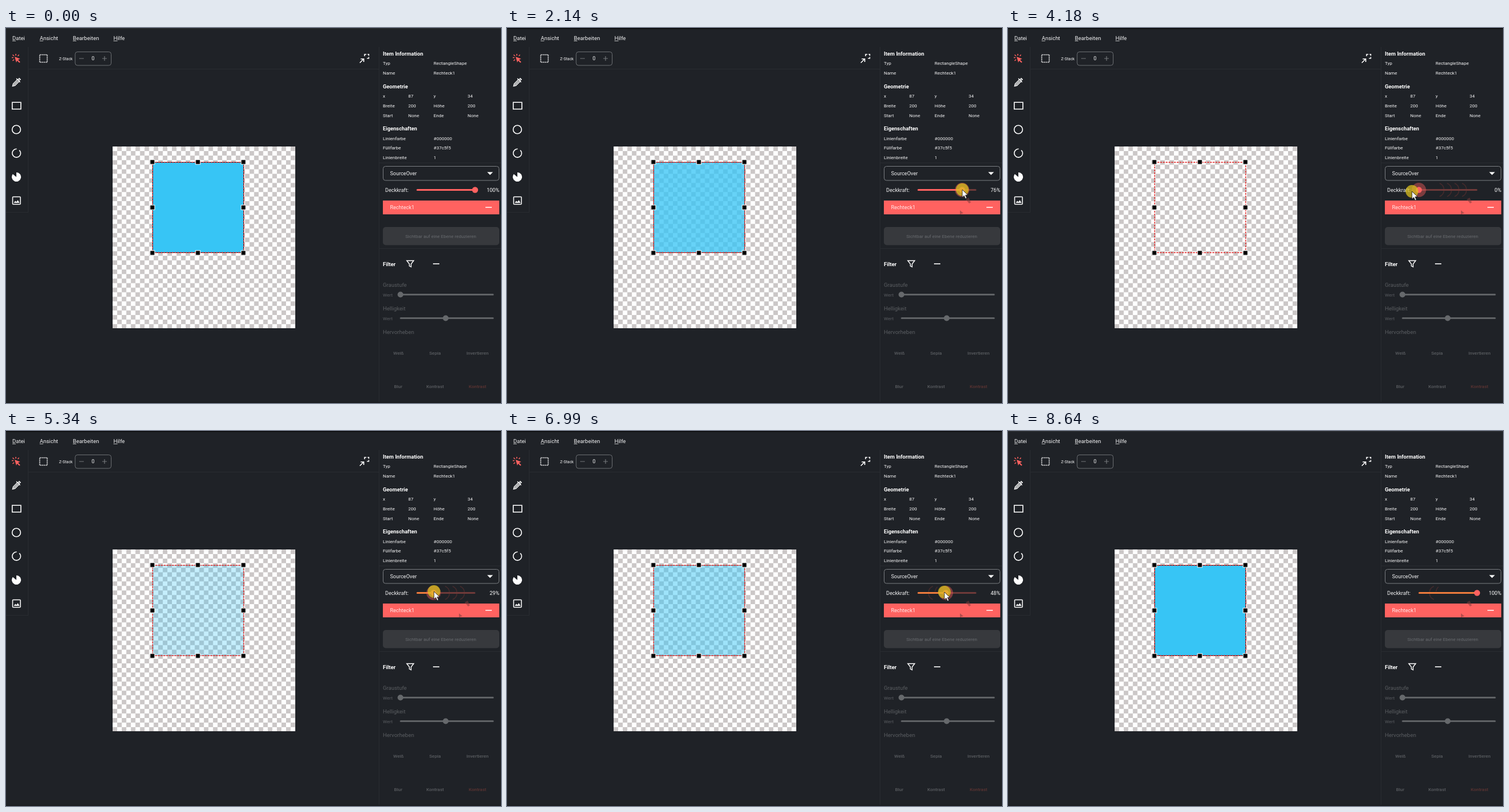
An HTML page that plays this animation: 859 by 652 pixels, repeating every 8.71 s.

```html
<!DOCTYPE html>
<html lang="de">
<head>
<meta charset="utf-8">
<title>Deckkraft</title>
<style>
  html, body { margin: 0; width: 100%; height: 100%; overflow: hidden; background: #1f2227; }
  svg { display: block; width: 859px; height: 652px; font-family: Roboto, sans-serif; }
</style>
</head>
<body>
<svg id="stage" viewBox="0 0 859 652" xmlns="http://www.w3.org/2000/svg">
  <defs>
    <pattern id="check" x="185" y="206" width="15.84" height="15.84" patternUnits="userSpaceOnUse">
      <path fill="#fff" d="M0 0h15.84v15.84H0z"/>
      <path fill="#cbc7c7" d="M7.92 0h7.92v7.92H7.92zM0 7.92h7.92v7.92H0z"/>
    </pattern>
  </defs>

  <path fill="#1f2227" d="M0 0h859v652H0z"/>
  <path id="edge" d="M0 0h859v1.5H0z"/>
  <path fill="#1a1c20" d="M0 650h859v2H0z"/>
  <path fill="none" stroke="#292c31" d="M38.5 33V320.5H0M39 71.500H648M647.500 33V650M648 234.500H859M648 383.500H859"/>

  <!-- tools -->
  <g fill="none" stroke="#fff" stroke-width="1.6">
    <g stroke="#ff6260" stroke-width="1.5">
      <path fill="#ff6260" stroke="none" d="M15 50l9.500 3.600-3.600 1.700 3.800 3.800-1.500 1.500-3.800-3.800-1.500 3.300z"/>
      <path d="M10 51.500h3M11.500 46.500l2.500 2.200M17 45v3M22.500 46.500l-2 2.200M11.500 57l2.500-2.200"/>
    </g>
    <path stroke-width="1.400" d="M11.500 101l1-4 7.500-7.500 3 3-7.500 7.500zM18 87.800l6.500 6.500M21 90l2-2.500 2 2-2.500 2M13.500 99l7-7"/>
    <path d="M10.800 129.300h15v11.700h-15z"/>
    <circle cx="18" cy="176.500" r="7.300"/>
    <path d="M18.500 210.300a7.300 7.300 0 1 0 6.800 8.800M23 212.500a7.300 7.300 0 0 1 2.300 6.500"/>
    <path fill="#fff" stroke="none" d="M18 259V251a8 8 0 1 1-6.200 3z"/>
    <rect x="11.500" y="293.500" width="13.500" height="13" rx="1" stroke-width="1.500"/>
    <path fill="#fff" stroke="none" d="M13.500 304l2.700-3.500 1.800 2 2.500-3.300 3 4.800z"/>
    <rect x="58.500" y="46.500" width="13" height="13" stroke-dasharray="2 1.250"/>
    <path d="M614 60.500l6.500-6.500M615.500 53.700h5.300V59M622.300 49v-3.300h3M627.500 45.700h2v2.500M629.500 50.500v2.300h-3"/>
    <path fill="none" d="M695.500 404.500h12l-4.500 5.800v5l-3-1.500v-3.500z" stroke-width="1.400"/>
    <path d="M741 410h11"/>
  </g>

  <!-- frames -->
  <g fill="none" stroke="#6b6e72">
    <rect x="120" y="41.500" width="62.500" height="23.500" rx="4"/>
    <path d="M127 53h8M167 53h8M171 49v8" stroke="#74777b" stroke-width="1.200"/>
    <rect x="654.500" y="240.500" width="201" height="24.500" rx="4" stroke="#7b7e82"/>
  </g>
  <path fill="#fff" d="M835 250.500h10l-5 5z"/>
  <path fill="#ff6260" d="M654 300h202v24H654z"/>
  <path fill="#fff" d="M832 311h11v1.500h-11z"/>
  <rect x="654" y="346" width="202" height="31.500" rx="5" fill="#37393d"/>
  <g stroke="#5f6265" stroke-width="3" stroke-linecap="round" fill="#66696c">
    <path d="M685 463.500H845M685 504.500H845"/>
    <circle cx="684.500" cy="463.500" r="5" stroke="none"/>
    <circle cx="763" cy="504.500" r="5" stroke="none"/>
  </g>
  <g id="labels"></g>

  <!-- canvas -->
  <path fill="url(#check)" d="M185 206h317v316H185z"/>
  <g id="shape">
    <path fill="#37c5f5" stroke="#000" d="M254.500 233.500h158v157h-158z"/>
  </g>
  <path fill="none" stroke="#e01b1b" stroke-width="1.400" stroke-dasharray="3.200 1.600" d="M254.500 233.500h158v157h-158z"/>
  <g id="grips" stroke="#fff"></g>

  <!-- opacity slider -->
  <g id="ghosts" fill="none" stroke="#6a3432" stroke-width="1.500" opacity=".5"></g>
  <path id="marks" fill="#7c3d3d" opacity=".55" d="M796 298l5-3 4 8-3 2zM786 324v-7l6 5z"/>
  <g stroke-width="3" stroke-linecap="round">
    <path stroke="#6f3a39" d="M714 281.500H813"/>
    <path id="fill"/>
  </g>
  <circle id="halo" cy="281.500" r="12.500" fill="#ff6260" opacity=".42"/>
  <circle id="knob" cy="281.500" r="5.200" fill="#ff6260"/>
  <text id="percent" x="856" y="284.700" font-size="9" fill="#fff" text-anchor="end"></text>

  <g id="cursor">
    <circle r="11" fill="#dcc11e" opacity=".74"/>
    <path fill="#fff" stroke="#111" stroke-width=".8" d="M0 0V13.500l3.200-3 2.300 5.200 2.300-1-2.300-5.100h4.300z"/>
  </g>
</svg>
<script>
const NS = 'http://www.w3.org/2000/svg';
const $ = id => document.getElementById(id);

function add(parent, tag, attrs) {
  const el = document.createElementNS(NS, tag);
  for (const k in attrs) el.setAttribute(k, attrs[k]);
  return parent.appendChild(el);
}

function label(x, mid, text, size = 8, fill = '#f4f4f5', weight = 400) {
  const el = add($('labels'), 'text', {
    x, y: mid + size * .355, 'font-size': size, fill, 'font-weight': weight
  });
  el.textContent = text;
}

// menu with underlined access keys
[[11, 'Datei', 6], [58.5, 'Ansicht', 6], [116, 'Bearbeiten', 6], [186.500, 'Hilfe', 7]].forEach(([x, s, w]) => {
  label(x, 17.5, s, 9.5);
  add($('labels'), 'path', { d: `M${x} 22.500h${w}`, stroke: '#ddd', 'stroke-width': .8 });
});
label(92, 53.5, 'Z-Stack', 7);
label(148.500, 53, '0', 9);

const bold = (x, y, s, size = 9.25) => label(x, y, s, size, '#fff', 700);
bold(654, 44.500, 'Item Information');
bold(654, 101.500, 'Geometrie');
bold(654, 175, 'Eigenschaften');
bold(654, 410.500, 'Filter', 9.5);

const row = (y, ...cells) => cells.forEach(([x, s]) => label(x, y, s));
row(61.5, [654, 'Typ'], [742, 'RectangleShape']);
row(78, [654, 'Name'], [742, 'Rechteck1']);
row(118.5, [654, 'x'], [698, '87'], [742, 'y'], [801, '34']);
row(135, [654, 'Breite'], [698, '200'], [742, 'Höhe'], [801, '200']);
row(152, [654, 'Start'], [698, 'None'], [742, 'Ende'], [801, 'None']);
row(192, [654, 'Linienfarbe'], [742, '#000000']);
row(208.5, [654, 'Füllfarbe'], [742, '#37c5f5']);
row(225.5, [654, 'Linienbreite'], [742, '1']);

label(666.5, 253, 'SourceOver', 9);
label(658, 281.5, 'Deckkraft:', 9);
label(666.5, 311.5, 'Rechteck1', 9, '#ffecec');
label(693, 362, 'Sichtbar auf eine Ebene reduzieren', 8, '#686b6f');

const dim = '#5a5d61';
[['Graustufe', 446.5], ['Helligkeit', 487.5], ['Hervorheben', 528.5]].forEach(([s, y]) => label(654, y, s, 9.5, dim));
[464, 505].forEach(y => label(654, y, 'Wert', 8, dim));
[[672, 565, 'Weiß'], [734.5, 565, 'Sepia'], [799, 565, 'Invertieren'], [673.5, 623, 'Blur'], [729.5, 623, 'Kontrast']]
  .forEach(([x, y, s]) => label(x, y, s, 8, dim, 500));
label(803, 623, 'Kontrast', 8, '#5e3533', 500);

for (let i = 0; i < 9; i++) {
  if (i === 4) continue;
  add($('grips'), 'rect', { x: 250 + i % 3 * 79, y: 229 + (i / 3 | 0) * 79, width: 8, height: 8 });
}

// faint halo outlines left behind by the drag
const ghosts = [745, 758, 771, 784].map(x => ({
  x, el: add($('ghosts'), 'path', { d: `M${x + 4} 270a12.500 12.500 0 0 1 0 23` })
}));
const leftGhost = add($('ghosts'), 'path', { d: 'M739 270a12.500 12.500 0 0 0 0 23M747 271a12 12 0 0 0-4 8' });

const LOOP = 8710;
// moving spans: start, end, step length
const spans = [[200, 1130, 66.4], [1590, 4180, 68.7], [4780, 6660, 69.5], [6990, 8370, 70]];
// time, cursor x, cursor y, opacity in percent
const keys = [
  [200, 766, 586, 100], [1130, 815, 282, 100], [1590, 814, 281, 100],
  [2140, 790, 281, 76], [3900, 713, 283, 0], [4180, 701, 284, 0],
  [4780, 701, 284, 0], [4940, 713, 282, 0], [5340, 743, 279, 29],
  [5950, 784, 279, 72], [6450, 764, 279, 53], [6660, 759, 280, 48],
  [6990, 759, 280, 48], [7400, 814, 282, 100], [7480, 823, 283, 100],
  [7810, 836, 288, 100], [8370, 850, 655, 100]
];

function stepped(t) {
  for (const [a, b, d] of spans)
    if (t >= a && t < b) return a + Math.floor((t - a) / d) * d;
  return t;
}

function pose(t) {
  let i = keys.findIndex(k => k[0] > t);
  if (i === 0) return keys[0].slice(1);
  if (i < 0) return keys[keys.length - 1].slice(1);
  const a = keys[i - 1], b = keys[i];
  let u = (t - a[0]) / (b[0] - a[0]);
  if (i === 1) u = u * u * (3 - 2 * u);
  if (i === keys.length - 1) u = u * u * (2 - u);
  return [1, 2, 3].map(c => a[c] + (b[c] - a[c]) * u);
}

const show = (el, on) => el.setAttribute('visibility', on ? 'visible' : 'hidden');

function draw(now) {
  const real = now % LOOP, t = stepped(real);
  const [x, y, p] = pose(t);
  const kx = 713 + 1.01 * p;

  $('edge').setAttribute('fill', real >= 1590 && real < 8640 ? '#08090a' : '#2a2d31');
  $('shape').setAttribute('opacity', p / 100);
  $('percent').textContent = Math.round(p) + '%';
  $('knob').setAttribute('cx', kx);
  $('halo').setAttribute('cx', kx);
  show($('halo'), t >= 1060 && t < 8000);
  $('fill').setAttribute('d', `M714 281.500H${Math.max(714, kx - 1)}`);
  $('fill').setAttribute('stroke', t >= 4780 ? '#ee7b3c' : '#ff6260');
  $('cursor').setAttribute('transform', `translate(${x} ${y})`);
  show($('cursor'), t >= 200 && real < 8370);

  show($('marks'), t >= 1130);
  for (const g of ghosts) show(g.el, t > 1590 && t < 5950 && kx < g.x - 8);
  show(leftGhost, t > 5600);
}

const begin = performance.now();
(function frame() {
  draw(performance.now() - begin);
  requestAnimationFrame(frame);
})();
</script>
</body>
</html>
```
